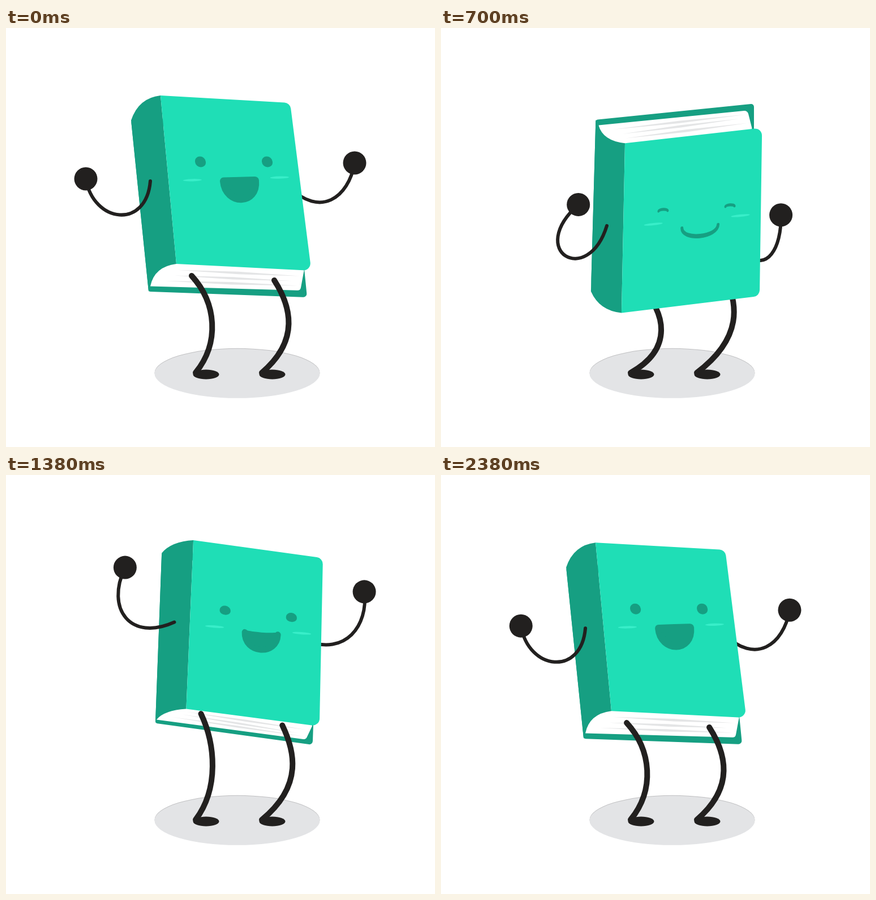
An HTML page with a canvas for the animation above (2400 ms loop, 758x739 px).

```html
<!DOCTYPE html>
<html lang="en">
<head>
<meta charset="utf-8">
<title>Dancing book</title>
<style>
  html, body { margin: 0; width: 100%; height: 100%; overflow: hidden; background: #fff; }
  canvas { display: block; }
</style>
</head>
<body>
<canvas id="stage" width="758" height="739"></canvas>
<script>
const ctx = document.getElementById('stage').getContext('2d');
const LOOP = 2400, KEYS = [0, 615, 1200, 1800, LOOP];
const COVER = '#1fdeb6', DARK = '#169f82', CHEEK = '#38eec9', INK = '#22201f', LINE = '#e4e5e6';

// Each point: x, y in the left jump, the crouch and the right jump.
// "drift" moves the second crouch of the loop away from the first.
const PARTS = {
  front: { drift: [1, 6.5], points: [
    [273, 119, 324.6, 209.5, 332.5, 88.5], [502, 132, 567.8, 178.2, 557.6, 136.5],
    [539.5, 428, 563.6, 475, 551, 433], [301, 416, 319, 509, 318, 385.5]] },
  back: { drift: [2.5, 0.3], points: [
    [221, 163, 273.3, 163.7, 275, 130.7], [500, 153, 553, 132, 553, 159],
    [532, 475, 553.5, 458.5, 538, 480.5], [252, 465, 265, 466.5, 263, 430]] },
  eyes: { drift: [0.7, 7.5], points: [
    [343.5, 236, 392.8, 329, 385.5, 213.7], [461.5, 236, 511, 319.5, 502.4, 232]] },
  leftArm: { drift: [1, 7], points: [
    [141, 266, 245, 322, 201, 119.5], [155, 345, 148, 406, 182, 190],
    [248, 355, 262, 469, 209, 246.5], [255, 270, 292.7, 355.3, 298.4, 232.5]] },
  rightArm: { drift: [-1, 9], points: [
    [616, 238, 598.3, 338.7, 642.5, 168.5], [605, 300, 599.3, 398.7, 651.5, 228.7],
    [555, 335, 573.3, 437.8, 607, 285], [500, 280, 540.6, 407.5, 529, 260]] },
  leftLeg: { drift: [0, -1], points: [
    [328, 437, 356, 462.5, 341.5, 410.5], [372, 485, 396.7, 501.7, 362.7, 467.6],
    [378, 555, 415, 566, 366.8, 549]] },
  rightLeg: { drift: [-4, -5], points: [
    [474, 445, 506, 445, 484.6, 441.8], [503, 490, 523, 485, 506, 485],
    [520, 550, 536, 545, 526, 548]] }
};

const mix = (a, b, k) => a + (b - a) * k;
const mixPoint = (p, q, k) => [mix(p[0], q[0], k), mix(p[1], q[1], k)];
const shift = (p, dx, dy) => [p[0] + dx, p[1] + dy];
const clamp = v => Math.max(0, Math.min(1, v));

function poseAt(time) {
  let i = 0;
  while (time >= KEYS[i + 1]) i++;
  const ease = (1 - Math.cos(Math.PI * (time - KEYS[i]) / (KEYS[i + 1] - KEYS[i]))) / 2;
  const up = i % 2 ? ease : 1 - ease;
  const jump = i === 0 || i === 3 ? 0 : 4;
  const late = i >= 2 ? 1 : 0;
  const pose = { up };
  for (const name in PARTS) {
    const { drift, points } = PARTS[name];
    pose[name] = points.map(p =>
      [0, 1].map(k => mix(p[2 + k] + drift[k] * late, p[jump + k], up)));
  }
  return pose;
}

function fillPoly(points, color, radii = []) {
  const n = points.length;
  ctx.beginPath();
  ctx.moveTo(...mixPoint(points[n - 1], points[0], 0.5));
  points.forEach((p, i) => ctx.arcTo(...p, ...points[(i + 1) % n], radii[i] || 0));
  ctx.closePath();
  ctx.fillStyle = color;
  ctx.fill();
}

function fillEllipse(x, y, rx, ry, color, angle = 0) {
  ctx.beginPath();
  ctx.ellipse(x, y, rx, ry, angle, 0, 2 * Math.PI);
  ctx.fillStyle = color;
  ctx.fill();
}

function limb([a, b, c, d], width) {
  ctx.beginPath();
  ctx.moveTo(...a);
  ctx.bezierCurveTo(...b, ...c, ...d);
  ctx.lineWidth = width;
  ctx.strokeStyle = INK;
  ctx.stroke();
}

function arm(points) {
  limb(points, 6);
  fillEllipse(...points[0], 20.5, 20.5, INK);
}

function leg(points, ankleX) {
  limb([...points, [ankleX, 608]], 10);
  fillEllipse(ankleX + 18.5, 611, 23, 8.5, INK);
}

// Shape between two arcs over the same chord, with a rounded outline.
function lens(x, y, half, top, bottom, width) {
  ctx.beginPath();
  ctx.moveTo(x - half, y);
  ctx.bezierCurveTo(x - half, y + top * 4 / 3, x + half, y + top * 4 / 3, x + half, y);
  ctx.bezierCurveTo(x + half, y + bottom * 4 / 3, x - half, y + bottom * 4 / 3, x - half, y);
  ctx.closePath();
  ctx.fillStyle = ctx.strokeStyle = DARK;
  ctx.lineWidth = width;
  ctx.fill();
  ctx.stroke();
}

function pageLines(frontLeft, frontRight, pageLeft, pageRight) {
  const thick = 2.2 * clamp(Math.abs(pageRight[1] - frontRight[1]) / 30);
  [0.27, 0.52, 0.76].forEach((k, i) => {
    const a = shift(mixPoint(frontLeft, pageLeft, k), 14 + 6 * (i % 2), 0);
    const b = shift(mixPoint(frontRight, pageRight, k), -6 - 12 * (i % 2), 0);
    const m = mixPoint(a, b, 0.5);
    fillPoly([a, shift(m, 0, -thick), b, shift(m, 0, thick)], LINE);
  });
}

function spineControl(front, back) {
  return [front[0] - 39, mix(front[1], back[1], 0.1)];
}

function drawSpine(front, back, topEnd, bottomEnd) {
  ctx.beginPath();
  ctx.moveTo(...front[0]);
  ctx.quadraticCurveTo(...spineControl(front[0], back[0]), ...topEnd);
  ctx.lineTo(...back[0]);
  ctx.lineTo(...back[3]);
  ctx.lineTo(...bottomEnd);
  ctx.quadraticCurveTo(...spineControl(front[3], back[3]), ...front[3]);
  ctx.closePath();
  ctx.fillStyle = DARK;
  ctx.fill();
}

function drawFace({ eyes: [left, right], front, up }) {
  const tilt = (right[1] - left[1]) / 118;
  const skew = (front[3][0] - front[0][0]) / 298;
  for (const eye of [left, right]) {
    ctx.save();
    ctx.transform(1, tilt, skew, 1, ...eye);
    lens(0, 0, 8, -mix(3.5, 8, up), mix(-3, 8, up), mix(4, 3, up));
    ctx.restore();
  }
  ctx.save();
  ctx.transform(1, tilt - 0.03, skew, 1, ...mixPoint(left, right, 0.5));
  for (const x of [-76, 78]) fillEllipse(x, 19 + 11 * up, 16.5, 2.1, CHEEK);
  const lip = mix(5, 14, up * up);
  lens(6.8, 31 + 3 * up, 34.5 - lip / 2, mix(17, 0, up), mix(18, 31.5, up), lip);
  ctx.restore();
}

function drawBook(pose) {
  const { front, back } = pose;
  const topDepth = clamp((front[0][1] - back[0][1]) / 25);
  const lowLeft = clamp((back[3][1] - front[3][1]) / 38);
  const lowRight = clamp((back[2][1] - front[2][1]) / 42);
  const pages = [
    shift(back[0], 5, 9.5), shift(back[1], -11.5, 12),
    shift(front[1], -18, 0), shift(front[2], -13, 0),
    shift(back[2], -12, -12 * lowRight), shift(back[3], 3 * lowLeft, -9.5 * lowLeft)
  ];
  fillPoly(back, DARK, [4, 5, 6, 4]);
  fillPoly(pages, '#fff', [0, 7, 0, 0, 6, 0]);
  pageLines(front[0], pages[2], pages[0], pages[1]);
  pageLines(front[3], pages[3], pages[5], pages[4]);
  leg(pose.leftLeg, 335);
  leg(pose.rightLeg, 452);
  drawSpine(front, back, shift(back[0], 5 * topDepth, 9.5 * topDepth), pages[5]);
  fillPoly(front, COVER, [0, 12, 12, 0]);
}

function draw(time) {
  const pose = poseAt(time);
  ctx.fillStyle = '#fff';
  ctx.fillRect(0, 0, 758, 739);
  ctx.lineCap = ctx.lineJoin = 'round';
  fillEllipse(408.5, 608.3, 146, 43.5, '#bfbfc1');
  fillEllipse(408.5, 609.3, 146, 43.5, '#e3e4e6');
  arm(pose.rightArm);
  drawBook(pose);
  drawFace(pose);
  arm(pose.leftArm);
}

const start = performance.now();
function tick() {
  draw((performance.now() - start) % LOOP);
  requestAnimationFrame(tick);
}
tick();
</script>
</body>
</html>
```
